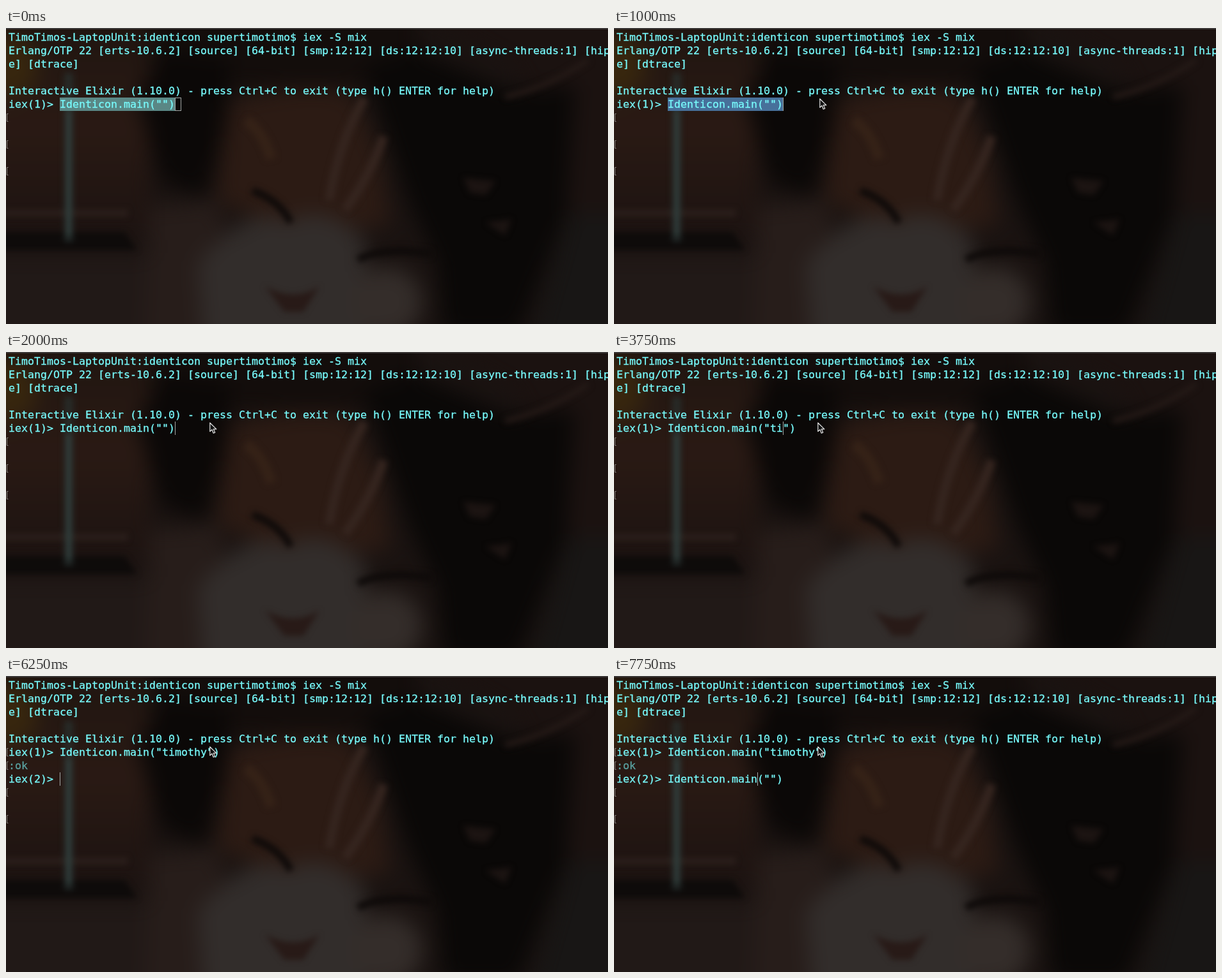
An HTML page for the animation above (8000 ms loop, 941 px wide and 464 px high).

```html
<!DOCTYPE html>
<html lang="en">
<head>
<meta charset="utf-8">
<title>Terminal session</title>
<style>
  html, body { margin: 0; width: 100%; height: 100%; overflow: hidden; background: #1b1412; }
  #stage { position: relative; width: 941px; height: 464px; overflow: hidden; }
  #stage > * { position: absolute; }
  pre {
    left: 4px; top: 4px; margin: 0; color: #78fcfd;
    font: 16.61px/21px "DejaVu Sans Mono", monospace;
    font-variant-ligatures: none;
    -webkit-text-stroke: .3px;
  }
  pre i { font-style: normal; color: #5aa3a2; }
  #select { left: 84px; top: 109px; width: 180px; height: 21px; }
  #caret { height: 21px; box-sizing: border-box; border: 1px solid #a3a8a7; }
</style>
</head>
<body>
<div id="stage">
  <svg width="941" height="464">
    <defs>
      <filter id="soft" x="-20%" y="-20%" width="140%" height="140%" color-interpolation-filters="sRGB">
        <feGaussianBlur stdDeviation="16"/>
      </filter>
      <filter id="fine" x="-20%" y="-20%" width="140%" height="140%" color-interpolation-filters="sRGB">
        <feGaussianBlur stdDeviation="5"/>
      </filter>
      <linearGradient id="wall" x2="0" y2="1">
        <stop stop-color="#1f1510"/>
        <stop offset=".5" stop-color="#2a1a14"/>
        <stop offset="1" stop-color="#1c1311"/>
      </linearGradient>
    </defs>
    <rect width="941" height="464" fill="#1a1311"/>
    <g filter="url(#soft)">
      <path fill="url(#wall)" d="M-40-20H225V330H-40z"/>
      <ellipse fill="#37260e" cx="0" cy="60" rx="50" ry="50"/>
      <path fill="#211917" d="M-40 355H230V500H-40z"/>
      <path fill="#130d0b" d="M230-40H640V90H230z"/>
      <path fill="#1b1210" d="M620-40H980V290H870L800 60z"/>
      <path fill="#2c1b14" d="M345 120Q430 85 540 100L585 200L600 310L450 320L330 270z"/>
      <path fill="#271d1a" d="M225 280L330 270L380 500H215z"/>
      <path fill="#322d2b" d="M300 370Q380 270 440 305Q490 270 560 330L570 500H310z"/>
      <path fill="#0b0807" d="M205 110L250 35L350 50L345 150L310 265L245 240z"/>
      <path fill="#0a0807" d="M560 60L640 35L790 100L890 90L875 290L800 480L685 480L675 370L630 270z"/>
      <path fill="#181615" d="M880 290H980V500H820z"/>
      <ellipse fill="#342d2a" cx="595" cy="430" rx="55" ry="55"/>
    </g>
    <g filter="url(#fine)" fill="none">
      <path fill="#0e0b0a" d="M-20 320H185L205 348H-20z"/>
      <path stroke="#2b1f1b" stroke-width="10" d="M-20 290H190"/>
      <path stroke="#283331" stroke-width="14" opacity=".7" d="M98 70V335"/>
      <path stroke="#354644" stroke-width="6" d="M98 130V325"/>
      <path stroke="#35251f" stroke-width="14" d="M560 110Q520 180 505 270M590 170Q570 230 530 285"/>
      <path stroke="#352217" stroke-width="16" d="M375 145Q400 160 415 205"/>
      <path stroke="#0e0a09" stroke-width="11" d="M385 255Q428 270 445 305M550 363Q590 342 665 354"/>
      <path stroke="#251a17" stroke-width="8" d="M780 108Q850 92 910 50"/>
      <path fill="#1c1412" d="M715 235L765 240L750 262L725 258zM750 305L790 300L780 325z"/>
      <path fill="#281a17" d="M405 405Q450 430 490 405L465 445H435z"/>
    </g>
    <path fill="#3d3a39" d="M0 0H941V2H0z"/>
    <g fill="none" stroke="#85817d">
      <path d="M3.5 134.5H1.5V146.5H3.5M3.5 176.5H1.5V188.5H3.5M3.5 218.5H1.5V230.5H3.5"/>
      <path id="mark" d="M3.5 113.5H1.5V125.5H3.5"/>
    </g>
  </svg>
  <div id="select"></div>
  <div id="caret"></div>
  <pre>TimoTimos-LaptopUnit:identicon supertimotimo$ iex -S mix
Erlang/OTP 22 [erts-10.6.2] [source] [64-bit] [smp:12:12] [ds:12:12:10] [async-threads:1] [hip
e] [dtrace]

Interactive Elixir (1.10.0) - press Ctrl+C to exit (type h() ENTER for help)
iex(1)&gt; Identicon.main("<span id="name"></span>")
<span id="reply"><i>:ok</i>
iex(2)&gt; <span id="next"></span></span></pre>
  <svg id="pointer" width="13" height="19">
    <path fill="#111" stroke="#e8e8e8" stroke-width="1.2" stroke-linejoin="round"
      d="M.8 1V14.6L4 11.7L6.2 17.2L8.7 16.2L6.4 10.9H10.8z"/>
  </svg>
</div>
<script>
  const el = Object.fromEntries([...document.querySelectorAll("[id]")].map(e => [e.id, e]));
  const LOOP = 8000, COL = 10;

  // Each track is a list of [start time, value]; values change in hard steps.
  const typed = [[0, 0], [3750, 2], [4000, 4], [4250, 6], [4500, 7]];
  const caretCol = [[0, 26], [2750, 24], [3750, 26], [4000, 28], [4250, 30], [4500, 31], [6250, 8], [7750, 22]];
  const pointerAt = [[0, null], [500, [345, 128]], [750, [330, 126]], [1000, [321, 110]], [1750, [318, 110]]];
  const selection = [[0, "#5a8785"], [1000, "#47709a"], [2000, "transparent"]];
  const at = (track, t) => track.findLast(([start]) => start <= t)[1];
  const show = (e, on) => e.style.visibility = on ? "visible" : "hidden";

  function draw(now) {
    const t = now % LOOP, focused = t >= 1000, done = t >= 6250;
    const pos = at(pointerAt, t);

    el.name.textContent = "timothy".slice(0, at(typed, t));
    el.next.textContent = t >= 7750 ? 'Identicon.main("")' : "";
    show(el.reply, done);
    show(el.mark, done);
    el.select.style.background = at(selection, t);

    const caret = el.caret.style;
    caret.left = 4 + COL * at(caretCol, t) + "px";
    caret.top = (done ? 151 : 109) + "px";
    caret.width = focused ? "1px" : "10px";
    caret.borderRightWidth = focused ? "0" : "1px";

    show(el.pointer, pos);
    if (pos) {
      el.pointer.style.left = pos[0] + "px";
      el.pointer.style.top = pos[1] + "px";
    }
    requestAnimationFrame(draw);
  }
  draw(performance.now());
</script>
</body>
</html>
```
